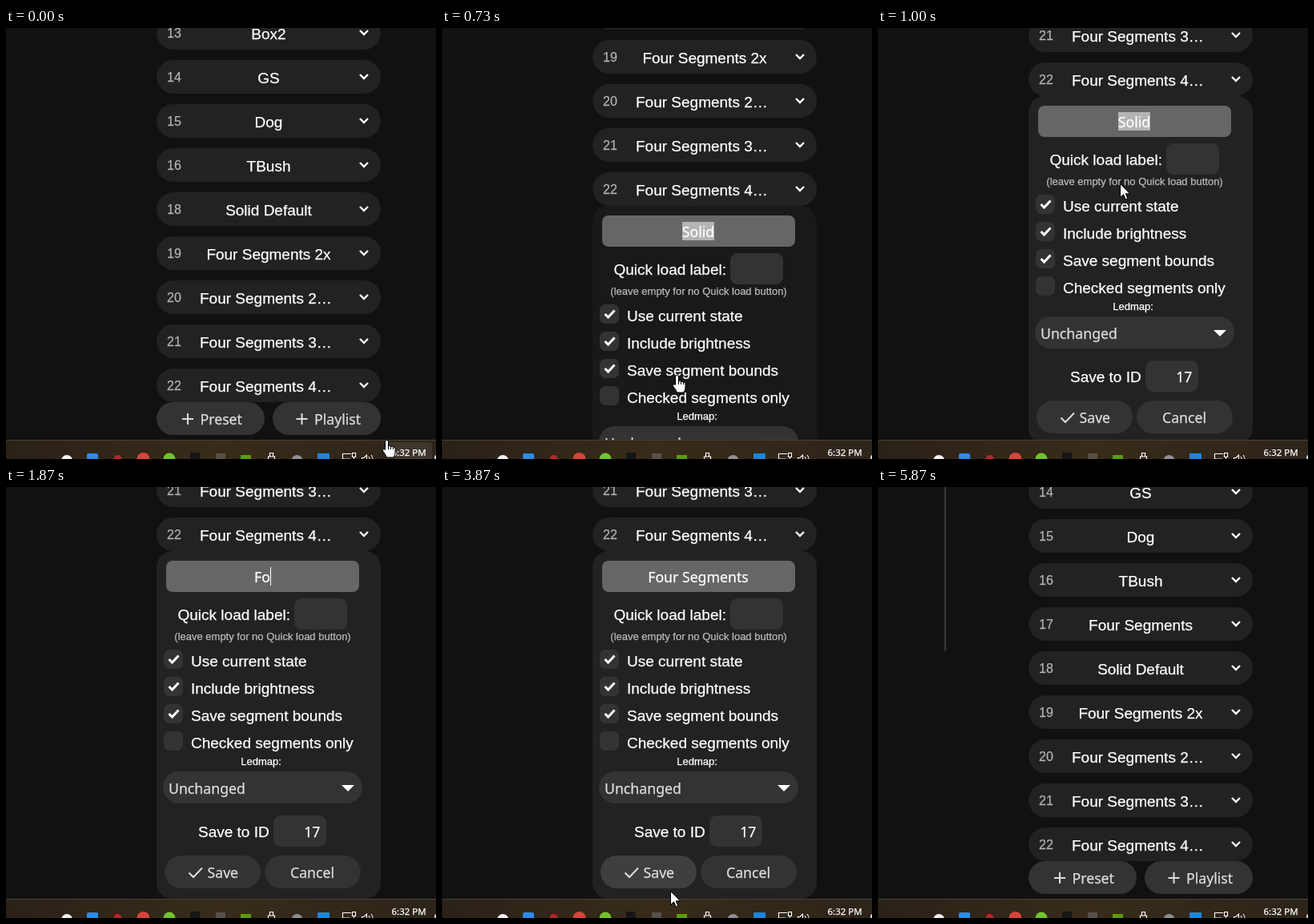
An HTML page for the animation above (6.47 s loop, 537 by 538 pixels).

```html
<!DOCTYPE html>
<html lang="en">
<head>
<meta charset="utf-8">
<title>Saving a preset</title>
<style>
html, body { margin: 0; width: 100%; height: 100%; overflow: hidden; background: #111; }
svg { display: block; width: 537px; height: 538px; }
text {
  color: #fff; fill: currentColor; stroke: currentColor; stroke-width: .25px; white-space: pre;
  font: 19px "Liberation Sans", Arial, sans-serif;
}
text.id { color: #b4b4b4; font-size: 16px; }
text.small { font-size: 13px; }
text.hint { font-size: 13px; color: #bbb; }
text.ui { color: #ddd; font: 17.7px "Noto Sans", "Open Sans", sans-serif; }
text.entry { color: #fff; }
text.clock { font: 11.5px "Noto Sans", "Open Sans", sans-serif; }
.mid { text-anchor: middle; }
.end { text-anchor: end; }
.line { fill: none; }
</style>
</head>
<body>
<svg viewBox="0 0 537 538">
  <defs>
    <linearGradient id="bar">
      <stop offset="0" stop-color="#2a2118"/>
      <stop offset=".5" stop-color="#382b19"/>
      <stop offset="1" stop-color="#2d241a"/>
    </linearGradient>
  </defs>
  <rect width="537" height="538" fill="#111"/>
  <g id="rows"></g>
  <g id="panel"></g>
  <g id="buttons"></g>
  <path id="edge" stroke="#444" stroke-width="1.5"/>
  <g id="taskbar"></g>
  <g id="cursor" stroke="#000" stroke-linejoin="round">
    <path id="arrow" fill="#fff" d="M0 0V17L4 13.3L6.7 19.5L9.3 18.4L6.7 12.3H12Z"/>
    <path id="hand" fill="#fff" d="M-2 2a2 2 0 0 1 4 0v5.5q2-1 3 .5q2-.7 3 .7q2-.4 2.5 1.5v5q0 3-2 6.3h-8.5q-1-3-5-8q-.8-3 3-1.8zM2 7.5v4M5 8v3.5M8 8.7v3"/>
    <path id="beam" fill="none" stroke="#ddd" d="M-3-8.5H-.5M.5-8.5H3M0-8V8M-3 8.5H-.5M.5 8.5H3"/>
  </g>
</svg>
<script>
const LOOP = 6470, STEP = 200 / 3;
const OPENED = 670, SAVED = 4470, BOTTOM = 446, PITCH = 55;
const $ = id => document.getElementById(id);
const show = (el, on) => el.setAttribute('display', on ? 'inline' : 'none');

const box = (x, y, w, h, r, fill, extra = '') =>
  `<rect x="${x}" y="${y}" width="${w}" height="${h}" rx="${r}" fill="${fill}" ${extra}/>`;
const label = (x, y, text, cls = '') => `<text x="${x}" y="${y}" class="${cls}">${text}</text>`;
const stroke = (d, width, color = '#fff') =>
  `<path class="line" d="${d}" stroke-width="${width}" stroke="${color}"/>`;
const disc = (x, y, r, fill) => `<circle cx="${x}" cy="${y}" r="${r}" fill="${fill}"/>`;

// Preset list, positioned relative to the centre of each pill
const presets = [
  [13, 'Box2'], [14, 'GS'], [15, 'Dog'], [16, 'TBush'], [17, 'Four Segments'],
  [18, 'Solid Default'], [19, 'Four Segments 2x'], [20, 'Four Segments 2…'],
  [21, 'Four Segments 3…'], [22, 'Four Segments 4…']
];
// Shortened names fill their column and start at its left edge
const title = name => name.endsWith('…') ? label(242, 8, name) : label(328, 8, name, 'mid');
$('rows').innerHTML = presets.map(([id, name]) => '<g>' +
  box(188, -21, 280, 42, 21, '#222') +
  label(201, 6, id, 'id') + title(name) +
  stroke('M442-3L447 2L452-3', 2.4) + '</g>').join('');
const rows = [...$('rows').children];

// Edit panel, relative to the centre of the last pill
const options = ['Use current state', 'Include brightness', 'Save segment bounds', 'Checked segments only'];
$('panel').innerHTML =
  box(188, 21, 280, 434, 20, '#222', 'id="sheet"') +
  box(200, 33, 241, 39, 8, '#666') +
  box(300, 41, 40, 23, 0, '#b4b4b4', 'id="selection"') +
  '<text id="entry" class="ui entry mid" x="320" y="60"></text>' +
  box(0, 41, 1, 23, 0, '#fff', 'id="caret"') +
  label(214.5, 107, 'Quick load label:') + box(360, 80, 66, 39, 9, '#333') +
  label(320.5, 132, '(leave empty for no Quick load button)', 'hint mid') +
  options.map((text, i) => {
    const y = 144 + 34 * i;
    return box(197, y, 24, 24, 7, '#333') + label(231, y + 21, text) +
      (i < 3 ? stroke(`M203.5 ${y + 12}l4 4l8-8.5`, 3) : '');
  }).join('') +
  label(318.5, 288, 'Ledmap:', 'small mid') +
  box(196, 296, 249, 40, 20, '#333') + label(203, 324, 'Unchanged', 'ui') +
  '<path d="M419 313h16l-8 8z" fill="#fff"/>' +
  label(240, 378, 'Save to ID') + box(334, 351, 66, 39, 9, '#333') +
  label(392.5, 378, '17', 'ui entry end') +
  box(198, 401, 120, 41, 20.5, '#333', 'id="save"') +
  stroke('M228.5 422.5l5.5 5.5l11-11.5', 2, '#ddd') + label(251.5, 429, 'Save', 'ui') +
  box(323, 401, 120, 41, 20.5, '#333') + label(355, 429, 'Cancel', 'ui');

const addButton = (x, plus, text, id) =>
  box(x, 467, 135, 41, 20.5, '#333', `id="${id}"`) +
  stroke(`M${plus} 488h14m-7-7v14`, 2, '#ddd') + label(plus + 22.5, 495, text, 'ui');
$('buttons').innerHTML = addButton(188, 220, 'Preset', 'preset') + addButton(333, 362.5, 'Playlist', 'playlist');

$('taskbar').innerHTML =
  box(0, 514, 537, 24, 0, 'url(#bar)') + box(0, 514, 537, 1, 0, '#48423a') +
  box(475, 517, 57, 30, 4, '#fff', 'id="clock" fill-opacity=".08"') +
  disc(76, 540, 7, '#f2f2f2') + box(101, 531, 14, 9, 2, '#2e8be6') +
  disc(139.5, 538, 5, '#b5262b') + disc(171.5, 538, 8, '#d8433a') +
  disc(204, 538, 7.5, '#71c52c') + box(230, 530, 12, 9, 1, '#161616') +
  box(262, 531, 12, 8, 0, '#56504a') + box(293, 533, 13, 6, 0, '#5d9a12') +
  stroke('M329.5 535v-4.5h4v4.5M327.5 539v-4h8v4', 1.2) +
  disc(363.5, 540, 7, '#8f8f92') + box(389, 531, 15, 9, 1, '#1d86d8') +
  stroke('M431 531.5h-10.5v6.5h9M432.5 530.5h4v5h-4zM434.5 536v3', 1.1) +
  stroke('M444.5 539v-2.5h2.5l3.5-3.5v6M453 535q1.5 2 1 4M456 533q2.5 3 2 6', 1.1) +
  label(481.5, 534, '6:32 PM', 'clock') + disc(538, 536, 3, '#ddd');

// Pointer waypoints: time, x, y, shape from that time on
const route = [
  [0, 475.5, 514.5, 'hand'], [330, 365, 493, 'hand'], [600, 291, 479, 'hand'], [670, 291, 472, 'hand'],
  [730, 293.5, 433.5, 'hand'], [870, 299, 285, 'arrow'], [1000, 302.5, 194.5, 'arrow'],
  [1130, 326, 143, 'arrow'], [1200, 340, 129, 'beam'], [1270, 348, 126, 'beam'], [1530, 348, 126, ''],
  [3670, 345, 126, 'beam'], [3730, 330, 220, 'arrow'], [3800, 300, 420, 'arrow'],
  [3870, 285.5, 504.5, 'arrow'], [4000, 285, 500, 'hand'], [4270, 286, 481, 'hand'],
  [4930, 286, 481, 'hand'], [5070, 262, 450, 'arrow'], [5600, 73.5, 222.5, 'arrow'],
  [5800, 22.5, 200, 'arrow'], [5870, 22.5, 200, ''], [LOOP, 22.5, 200, '']
];
function pointerAt(t) {
  const i = route.findIndex(p => p[0] > t) - 1;
  const [t0, x0, y0, shape] = route[i], [t1, x1, y1] = route[i + 1];
  const k = (t - t0) / (t1 - t0);
  return { x: x0 + (x1 - x0) * k, y: y0 + (y1 - y0) * k, shape };
}

// When each character of the new name appears
const NAME = 'Four Segments';
const keyTimes = [1530, 1870, 2070, 2130, 2330, 2470, 2670, 2730, 2870, 3000, 3070, 3130, 3270];

function render(time) {
  const tickTime = Math.round(Math.floor((time + 4) / STEP) * STEP / 10) * 10;
  const t = Math.min(tickTime, LOOP - 1);
  const editing = t >= OPENED && t < SAVED, saved = t >= SAVED;
  const scroll = editing ? Math.round(387 * (1 - Math.exp(-(t - 649) * 0.01235))) : 0;
  const last = BOTTOM - scroll;

  let y = last;
  for (let i = rows.length - 1; i >= 0; i--) {
    const visible = saved || presets[i][0] !== 17;
    show(rows[i], visible);
    if (!visible) continue;
    rows[i].setAttribute('transform', `translate(0 ${y})`);
    y -= PITCH;
  }

  const { x: px, y: py, shape } = pointerAt(t);
  const hover = (left, top, w, h = 41) =>
    shape && px >= left && px <= left + w && py >= top && py <= top + h;
  const tint = (id, on) => $(id).setAttribute('fill', on ? '#3f3f3f' : '#333');

  show($('panel'), editing);
  show($('buttons'), !editing);
  if (editing) {
    $('panel').setAttribute('transform', `translate(0 ${last})`);
    $('sheet').setAttribute('fill-opacity', Math.min(1, 0.5 + (t - 730) / 400));
    const typed = keyTimes.filter(k => k <= t).length;
    $('entry').textContent = typed ? NAME.slice(0, typed) : 'Solid';
    show($('selection'), !typed);
    show($('caret'), typed && (t - keyTimes[typed - 1]) % 1060 < 530);
    $('caret').setAttribute('x', Math.round(320 + $('entry').getComputedTextLength() / 2));
    tint('save', hover(198, last + 401, 120, 46));
  } else {
    tint('preset', hover(188, 467, 135));
    tint('playlist', hover(333, 467, 135));
  }
  show($('clock'), hover(475, 514, 57));

  show($('edge'), t >= 5670);
  $('edge').setAttribute('d', `M84 0V${t < 5870 ? 538 : 205}`);

  for (const id of ['arrow', 'hand', 'beam']) show($(id), id === shape);
  $('cursor').setAttribute('transform', `translate(${px} ${py})`);
}

function tick() {
  render(performance.now() % LOOP);
  requestAnimationFrame(tick);
}
tick();
</script>
</body>
</html>
```
